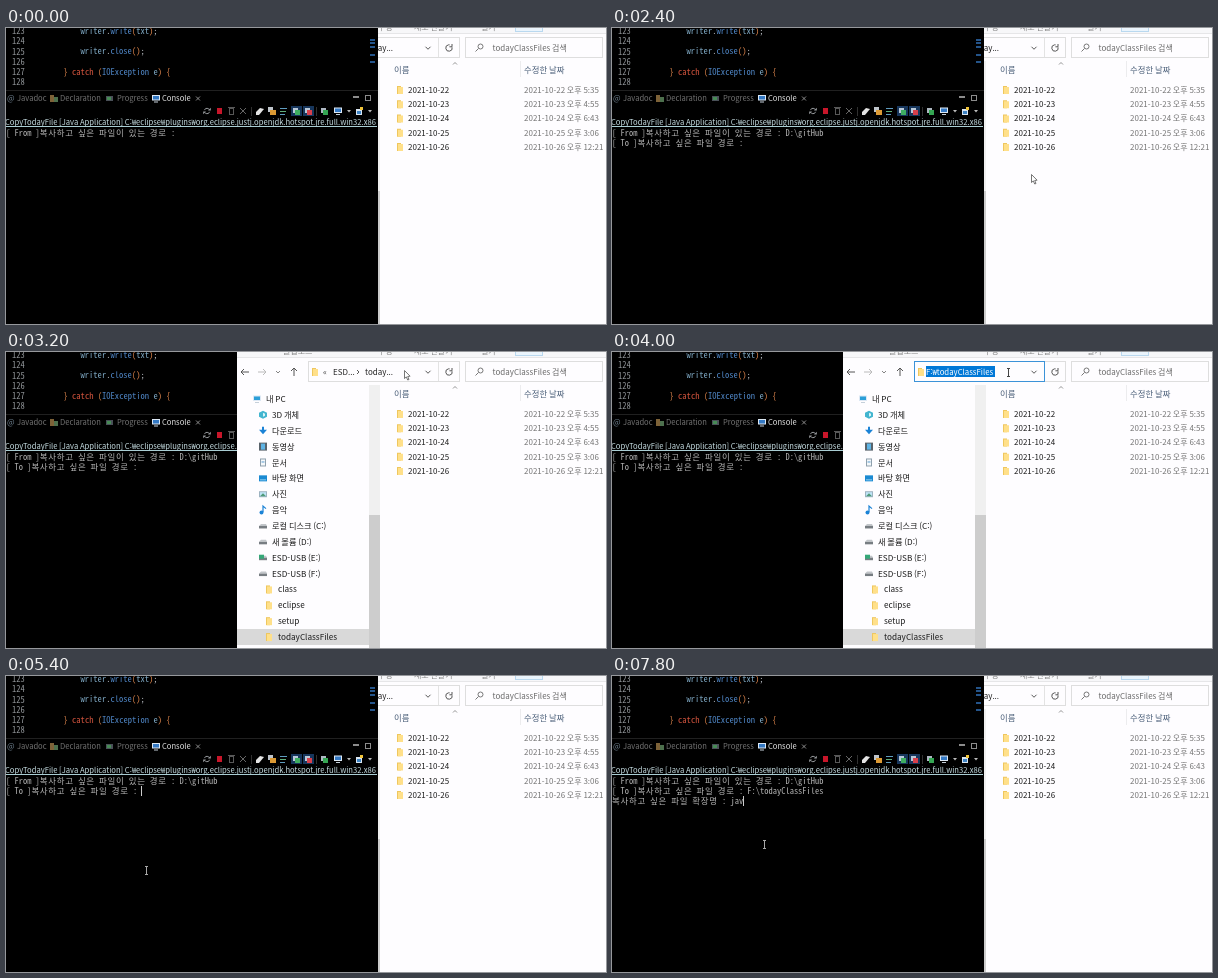
Animation, 600 px wide and 296 px high, one loop 8 s. Source, as an HTML page with a canvas:

```html
<!DOCTYPE html>
<html lang="ko">
<head>
<meta charset="utf-8">
<title>Copy files</title>
<style>
html, body { margin: 0; width: 100%; height: 100%; overflow: hidden; background: #000; }
canvas { display: block; width: 600px; height: 296px; }
</style>
</head>
<body>
<canvas id="stage" width="600" height="296"></canvas>
<script>
const ctx = document.getElementById('stage').getContext('2d');
const LOOP = 8000, STEP = 200;
const SANS = '"Noto Sans CJK KR", "Noto Sans CJK JP", "Noto Sans", sans-serif';
const MONO = '"Noto Sans Mono CJK KR", "Noto Sans CJK KR", "Noto Sans Mono", monospace';
const CELL = 4.23, CODE_CELL = 4.28;

// start time, tip x, tip y, shape
const POINTER = [
  [0, 0, 0, ''],
  [200, 188, 208, 'beam'],
  [400, 193, 229, 'beam'],
  [2400, 419, 146, 'arrow'],
  [2600, 418, 135, 'arrow'],
  [2800, 412, 76, 'arrow'],
  [3000, 404, 40, 'arrow'],
  [3200, 398, 18, 'arrow'],
  [3400, 397, 18, 'arrow'],
  [3600, 396, 20, 'beam'],
  [4200, 394, 20, 'beam'],
  [4600, 378, 38, 'arrow'],
  [4800, 300, 108, 'arrow'],
  [5000, 190, 172, 'beam'],
  [5200, 140, 194, 'beam'],
  [5600, 149, 166, 'beam'],
  [5800, 152, 168, 'beam']
];

function box(x, y, w, h, color) {
  ctx.fillStyle = color;
  ctx.fillRect(x, y, w, h);
}

function frame(x, y, w, h, color) {
  ctx.strokeStyle = color;
  ctx.lineWidth = 1;
  ctx.strokeRect(x + .5, y + .5, w - 1, h - 1);
}

function line(points, color, width = 1) {
  ctx.strokeStyle = color;
  ctx.lineWidth = width;
  ctx.beginPath();
  points.forEach(([x, y], i) => i ? ctx.lineTo(x, y) : ctx.moveTo(x, y));
  ctx.stroke();
}

function poly(points, color) {
  ctx.fillStyle = color;
  ctx.beginPath();
  points.forEach(([x, y]) => ctx.lineTo(x, y));
  ctx.fill();
}

function arc(x, y, r, from, to, color) {
  ctx.strokeStyle = color;
  ctx.lineWidth = 1;
  ctx.beginPath();
  ctx.arc(x, y, r, from, to);
  ctx.stroke();
}

// y is the middle of the capitals
function text(str, x, y, color, size = 8) {
  ctx.font = `${size}px ${SANS}`;
  ctx.fillStyle = color;
  ctx.fillText(str, x, y + size * .37);
}

// Terminal grid: Hangul takes two cells. Returns the end position.
function mono(str, x, y, color, cell = CELL) {
  ctx.font = `${cell * 2}px ${MONO}`;
  ctx.fillStyle = color;
  for (const ch of str) {
    ctx.fillText(ch, x, y + 3);
    x += ch > '\u1100' ? cell * 2 : cell;
  }
  return x;
}

// parts: [string, color] pairs on one line
function code(x, y, ...parts) {
  for (const [str, color] of parts) x = mono(str, x, y, color, CODE_CELL);
}

function chevron(x, y, dir, color, r = 2) {
  const d = {
    right: [[-r / 2, -r], [r / 2, 0], [-r / 2, r]],
    down: [[-r, -r / 2], [0, r / 2], [r, -r / 2]],
    up: [[-r, r / 2], [0, -r / 2], [r, r / 2]]
  }[dir];
  line(d.map(([a, b]) => [x + a, y + b]), color, .9);
}

function arrow(x, y, angle, color) {
  ctx.save();
  ctx.translate(x, y);
  ctx.rotate(angle);
  line([[-4, 0], [4, 0]], color);
  line([[1, -3], [4, 0], [1, 3]], color);
  ctx.restore();
}

function refresh(x, y, color) {
  arc(x, y, 3.2, -.2, 4.9, color);
  line([[x + 3, y - 4], [x + 3, y - 1.2], [x + .4, y - 1.2]], color);
}

function sync(x, y, color) {
  arc(x, y, 2.7, -2.8, -.5, color);
  arc(x, y, 2.7, .3, 2.6, color);
  poly([[x + 1, y - .5], [x + 3.8, y - .5], [x + 3.8, y - 3.3]], color);
  poly([[x - 1, y + .5], [x - 3.8, y + .5], [x - 3.8, y + 3.3]], color);
}

function folder(x, y) {
  box(x - 3, y - 4, 4, 8, '#efc75e');
  box(x - 2, y - 3, 5, 7, '#ffe08a');
}

function screen(x, y, color) {
  box(x - 4, y - 3.5, 8, 5.5, '#dce8f4');
  box(x - 3, y - 2.5, 6, 3.5, color);
  box(x - 2, y + 3, 4, 1, '#c5d0da');
}

function drive(x, y) {
  poly([[x - 4, y], [x - 2, y - 2], [x + 3, y - 2], [x + 4, y]], '#c2c6ca');
  box(x - 4, y, 8, 2.5, '#777d82');
}

function treeIcon(kind, x, y) {
  if (kind === 'folder') folder(x, y);
  else if (kind === 'pc') screen(x, y, '#2c9fd8');
  else if (kind === 'drive') drive(x, y);
  else if (kind === 'cube') {
    poly([[x, y - 4], [x + 4, y - 2], [x + 4, y + 2], [x, y + 4], [x - 4, y + 2], [x - 4, y - 2]], '#42b5cf');
    poly([[x, y - 2], [x + 2, y - 1], [x + 2, y + 1], [x, y + 2]], '#d8f3f8');
  } else if (kind === 'down') {
    box(x - 1, y - 4, 2, 4, '#1b83d6');
    poly([[x - 4, y - 1], [x + 4, y - 1], [x, y + 3.5]], '#1b83d6');
  } else if (kind === 'film') {
    box(x - 4, y - 4, 8, 8, '#59636b');
    box(x - 2, y - 3, 4, 6, '#5fb4e5');
  } else if (kind === 'page') {
    box(x - 3, y - 4, 6, 8, '#8fa0ad');
    box(x - 2, y - 3, 4, 6, '#f5f8fa');
    box(x - 1.5, y - 1, 3, 1, '#5b9bd0');
  } else if (kind === 'desk') {
    box(x - 4, y - 3, 8, 6, '#1b8ad2');
    box(x - 3, y + 1, 6, 1, '#8fd0f2');
  } else if (kind === 'photo') {
    box(x - 4, y - 3, 8, 6, '#9cb2c0');
    box(x - 3, y - 2, 6, 4, '#bfe4f7');
    poly([[x - 3, y + 2], [x, y - 1], [x + 3, y + 2]], '#4f9a78');
  } else if (kind === 'note') {
    ctx.fillStyle = '#1b83d6';
    ctx.beginPath();
    ctx.arc(x - 1.5, y + 2.5, 2, 0, 7);
    ctx.fill();
    line([[x, y + 2], [x, y - 4], [x + 3, y - 1.5]], '#1b83d6', 1.2);
  } else if (kind === 'usb') {
    drive(x, y);
    box(x - 4, y - 3, 5, 4, '#35a878');
  }
}

const TREE = [
  ['내 PC', 'pc', 0], ['3D 개체', 'cube', 1], ['다운로드', 'down', 1], ['동영상', 'film', 1],
  ['문서', 'page', 1], ['바탕 화면', 'desk', 1], ['사진', 'photo', 1], ['음악', 'note', 1],
  ['로컬 디스크 (C:)', 'drive', 1], ['새 볼륨 (D:)', 'drive', 1], ['ESD-USB (E:)', 'usb', 1],
  ['ESD-USB (F:)', 'drive', 1], ['class', 'folder', 2], ['eclipse', 'folder', 2],
  ['setup', 'folder', 2], ['todayClassFiles', 'folder', 2]
];
const TIMES = ['5:35', '4:55', '6:43', '3:06', '12:21'];

function ribbon() {
  box(231, 0, 369, 6, '#f7f7f9');
  box(231, 5, 369, 1, '#e6e6e8');
  [['클립보드', 277], ['구성', 372], ['새로 만들기', 408], ['열기', 475]]
    .forEach(([s, x]) => text(s, x, -1, '#888'));
  box(509, -2, 28, 6, '#b9d8ef');
  box(510, -2, 26, 5, '#eaf4fc');
}

function addressBar(editing) {
  arrow(239, 20, Math.PI, '#555');
  arrow(256, 20, 0, '#bbb');
  chevron(272, 20, 'down', '#777');
  arrow(288, 20, -Math.PI / 2, '#555');
  frame(302, 9, 152, 21, '#dedede');
  box(432, 10, 1, 19, '#e3e3e3');
  folder(309, 20);
  if (editing) {
    frame(302, 9, 131, 21, '#3c93d8');
    box(314, 14, 69, 11, '#0078d7');
    text('F:₩todayClassFiles', 314, 20, '#fff', 7.8);
  } else {
    text('«', 317, 20, '#444');
    text('ESD...', 327, 20, '#222');
    chevron(352, 20, 'right', '#444');
    text('today...', 359, 20, '#222');
  }
  chevron(422, 20, 'down', '#444', 2.5);
  refresh(443, 20, '#555');
  frame(459, 9, 138, 21, '#dedede');
  arc(474.5, 18.5, 2.5, 0, 7, '#777');
  line([[472.5, 20.5], [469.5, 23.5]], '#777');
  text('todayClassFiles 검색', 486.5, 20, '#6a6a6a');
}

function tree(open) {
  TREE.forEach(([name, icon, depth], i) => {
    const y = 47 + i * 15.87, x = 251 + depth * 6;
    if (i === TREE.length - 1) box(231, 277, 132, 16, '#d9d9d9');
    if (open) {
      const expanded = i === 0 || i === 11;
      chevron(x - 13.5, y, expanded ? 'down' : 'right', expanded ? '#444' : '#999');
    }
    treeIcon(icon, x, y);
    text(name, x + 9, y, '#1c1c1c', 8.2);
  });
  box(363, 33, 11, 263, '#f0f0f0');
  box(363, 163, 11, 133, '#cdcdcd');
}

function fileList(hover) {
  chevron(449, 35.5, 'up', '#888');
  text('이름', 388, 42, '#4c607a', 8.4);
  text('수정한 날짜', 518, 42, '#4c607a', 8.4);
  box(514, 33, 1, 16, '#ececee');
  TIMES.forEach((time, i) => {
    const y = 62 + i * 14.25, day = `2021-10-${22 + i}`;
    if (i === hover) box(383, 69, 217, 14, '#e5f3ff');
    folder(394, y);
    text(day, 402, y, '#1c1c1c');
    text(`${day} 오후 ${time}`, 518, y, '#757575');
  });
}

function explorer(t) {
  box(231, 0, 369, 296, '#fefdff');
  ribbon();
  addressBar(t >= 3600 && t < 5400);
  tree(t >= 4800 && t < 5400);
  fileList(t >= 2800 && t < 3000 ? 1 : -1);
}

function editor() {
  const plain = '#b8bcc2', bracket = '#d9824a', name = '#7fa9c4', call = '#4f86c6', word = '#d8563f';
  for (let i = 0; i < 6; i++) code(6, 3.3 + i * 10.1, [String(123 + i), '#909498']);
  code(74.5, 3.3, ['writer', name], ['.', plain], ['write', call], ['(', bracket],
    ['txt', name], [')', bracket], [';', plain]);
  code(74.5, 23.4, ['writer', name], ['.', plain], ['close', call], ['()', bracket], [';', plain]);
  code(57.5, 43.7, ['} ', bracket], ['catch ', word], ['(', bracket], ['IOException', call],
    [' e', name], [') {', bracket]);
  [11, 14, 18, 26, 33].forEach(y => box(364, y, 5, 2, '#24548a'));
}

function tabs() {
  box(0, 62, 372, 1, '#202020');
  const dim = '#737373';
  text('@', 1, 70.5, '#6f8190');
  text('Javadoc', 11, 70.5, dim, 7.6);
  box(44, 67, 4, 7, '#7d6238');
  box(48, 69, 4, 5, '#4d704d');
  text('Declaration', 54, 70.5, dim, 7.6);
  box(100, 68, 7, 5, '#4a5058');
  box(101, 69, 4, 3, '#468a55');
  text('Progress', 111, 70.5, dim, 7.6);
  screen(150, 70.5, '#3479c4');
  text('Console', 156, 70.5, '#e4e4e4', 7.6);
  line([[190, 68.5], [194, 72.5]], '#999', .9);
  line([[194, 68.5], [190, 72.5]], '#999', .9);
  box(347, 68, 6, 2, '#8c8c8c');
  frame(359, 67, 6, 6, '#8c8c8c');
}

function toolbar() {
  sync(201, 83, '#9a9da0');
  box(211, 80, 5, 6, '#c8162a');
  frame(223, 80, 5, 7, '#585858');
  box(222, 79, 7, 1, '#585858');
  line([[234, 80], [240, 86]], '#666');
  line([[240, 80], [234, 86]], '#666');
  box(245, 79, 1, 9, '#303030');
  poly([[250, 84], [254, 80], [258, 81], [253, 87], [250, 87]], '#e4e4e4');
  box(262, 79, 5, 5, '#bfc5cb');
  box(264, 82, 6, 5, '#dc9a34');
  box(274, 80, 7, 1, '#5f9cbf');
  box(274, 83, 6, 1, '#5fae7a');
  box(274, 86, 5, 1, '#5f9cbf');
  [[285, '#3fae62'], [297, '#d8404c']].forEach(([x, color]) => {
    box(x, 78, 11, 10, '#17365c');
    box(x + 2, 80, 5, 5, '#b9c8d8');
    box(x + 4, 82, 5, 5, color);
  });
  box(310, 79, 1, 9, '#303030');
  box(315, 80, 5, 5, '#aeb8c2');
  box(317, 82, 5, 5, '#35a653');
  screen(332, 83, '#3479c4');
  poly([[341, 82], [345, 82], [343, 84.5]], '#bbb');
  box(350, 81, 6, 6, '#d9e5f0');
  box(351, 83, 4, 3, '#3d83c4');
  box(354, 79, 3, 3, '#f1c53b');
  poly([[362, 82], [366, 82], [364, 84.5]], '#bbb');
}

function output(t) {
  const gray = '#b4b4b4';
  const suffix = t >= 7800 ? 'jav' : t >= 7400 ? 'ja' : t >= 7000 ? 'j' : '';
  let x = mono('[ From ]복사하고 싶은 파일이 있는 경로 : ', 0, 105, gray);
  if (t < 2400) return;
  mono('D:\\gitHub', x, 105, gray);
  x = mono('[ To ]복사하고 싶은 파일 경로 : ', 0, 115, gray);
  let y = 115;
  if (t >= 5800) x = mono('F:\\todayClassFiles', x, y, gray);
  if (t >= 6400) {
    y = 125;
    x = mono('복사하고 싶은 파일 확장명 : ' + suffix, 0, y, gray);
  }
  if (t >= 5400) box(Math.floor(x), y - 5, 1, 10, '#ccc');
}

function ide(t) {
  box(0, 0, 372, 296, '#000');
  editor();
  tabs();
  toolbar();
  text('CopyTodayFile [Java Application] C:₩eclipse₩plugins₩org.eclipse.justj.openjdk.hotspot.jre.full.win32.x86',
    -1, 94, '#c6dde2', 7.65);
  box(0, 98, 371, 1, '#a9cdd3');
  output(t);
}

function pointer(t) {
  const [, x, y, shape] = POINTER.filter(p => p[0] <= t).pop();
  if (shape === 'beam') {
    const color = x < 231 ? '#a8a8a8' : '#444';
    box(x, y - 4, 1, 8, color);
    box(x - 1, y - 4, 3, 1, color);
    box(x - 1, y + 4, 3, 1, color);
  } else if (shape === 'arrow') {
    const tip = [[0, 0], [0, 8], [1.8, 6.4], [3.2, 9.5], [4.5, 9], [3.2, 6], [5.6, 5.7], [0, 0]]
      .map(([a, b]) => [x + a + .5, y + b + .5]);
    poly(tip, '#fff');
    line(tip, '#555', .8);
  }
}

function clipped(x, w, paint) {
  ctx.save();
  ctx.beginPath();
  ctx.rect(x, 0, w, 296);
  ctx.clip();
  paint();
  ctx.restore();
}

function draw(now) {
  const t = Math.floor((now % LOOP) / STEP) * STEP;
  const edge = t >= 2600 && t < 5400 ? 231 : 372;
  clipped(0, edge, () => ide(t));
  clipped(edge, 600 - edge, () => explorer(t));
  pointer(t);
}

const start = performance.now();
function tick() {
  draw(performance.now() - start);
  requestAnimationFrame(tick);
}
tick();
</script>
</body>
</html>
```
